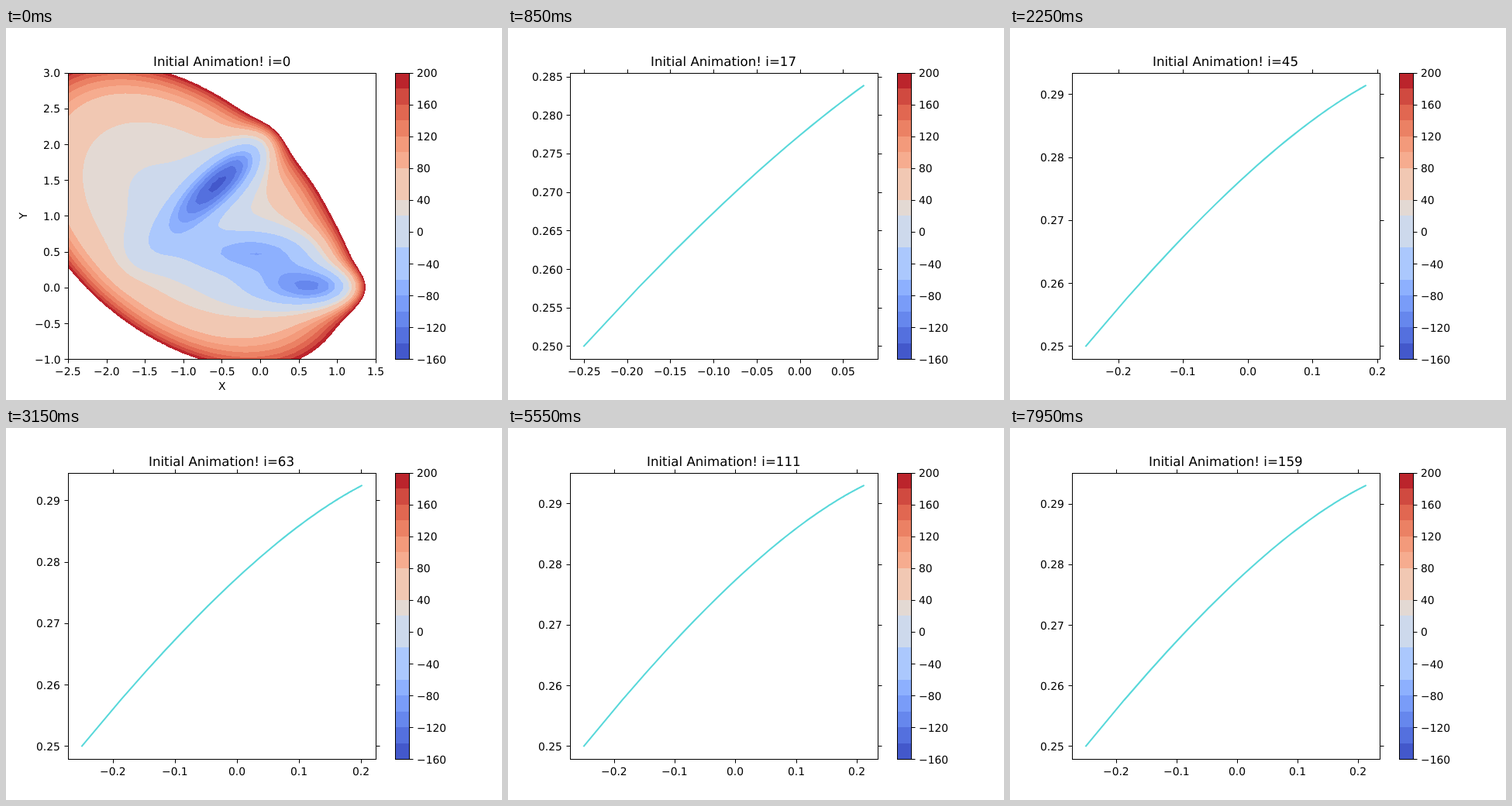
Write an HTML page with a canvas that moves like this. It is 640x480 px and loops after 8 s.

```html
<!DOCTYPE html>
<html lang="en">
<head>
<meta charset="utf-8">
<title>Initial Animation</title>
<style>
  html, body { margin: 0; width: 640px; height: 480px; overflow: hidden; background: #fff; }
  canvas { display: block; }
</style>
</head>
<body>
<canvas id="stage" width="640" height="480"></canvas>
<script>
const STEP_MS = 50, LOOP_MS = 8000, DAMPING = 0.05, START = [-0.25, 0.25];
const AXES = { left: 80, right: 476.8, top: 57.6, bottom: 427.2 };
const BAR = { left: 501.6, right: 520.08, top: 57.6, bottom: 427.2 };
const MARGIN = 0.05, TICK = 5, LABEL_GAP = 9.72;
const LEVEL_MIN = -160, LEVEL_MAX = 200, LEVEL_STEP = 20;
const BANDS = ['#4358cb', '#5470de', '#6687ed', '#799cf8', '#8db0fe', '#abc8fd',
  '#abc8fd', '#cdd9ec', '#cdd9ec', '#e3d9d3', '#f1c8b3', '#f1c8b3',
  '#f6ac8f', '#f39a7b', '#eb8164', '#e16751', '#d04a40', '#bb242c'];

// Müller–Brown potential: amplitude, a, b, c, x0, y0
const TERMS = [
  [-200, -1, 0, -10, 1, 0],
  [-100, -1, 0, -10, 0, 0.5],
  [-170, -6.5, 11, -6.5, -0.5, 1.5],
  [15, 0.7, 0.6, 0.7, -1, 1],
];

function potential(x, y) {
  const r = { v: 0, gx: 0, gy: 0, xx: 0, xy: 0, yy: 0 };
  for (const [A, a, b, c, x0, y0] of TERMS) {
    const dx = x - x0, dy = y - y0;
    const v = A * Math.exp(a * dx * dx + b * dx * dy + c * dy * dy);
    const px = 2 * a * dx + b * dy, py = b * dx + 2 * c * dy;
    r.v += v;
    r.gx += v * px;
    r.gy += v * py;
    r.xx += v * (px * px + 2 * a);
    r.xy += v * (px * py + b);
    r.yy += v * (py * py + 2 * c);
  }
  return r;
}

// Damped Newton iteration towards the saddle point
function newtonPath(count) {
  const path = [START];
  while (path.length < count) {
    const [x, y] = path[path.length - 1];
    const p = potential(x, y), det = p.xx * p.yy - p.xy * p.xy;
    path.push([
      x - DAMPING * (p.yy * p.gx - p.xy * p.gy) / det,
      y - DAMPING * (p.xx * p.gy - p.xy * p.gx) / det,
    ]);
  }
  return path;
}

const ctx = document.getElementById('stage').getContext('2d');
ctx.textRendering = 'geometricPrecision';
const path = newtonPath(LOOP_MS / STEP_MS);
const fullView = { x: [-2.5, 1.5], y: [-1, 3] };
const snap = v => Math.floor(v + 0.5) + 0.5;
const toX = (x, [lo, hi]) => AXES.left + (x - lo) / (hi - lo) * (AXES.right - AXES.left);
const toY = (y, [lo, hi]) => AXES.bottom - (y - lo) / (hi - lo) * (AXES.bottom - AXES.top);

function line(x1, y1, x2, y2) {
  ctx.beginPath();
  ctx.moveTo(x1, y1);
  ctx.lineTo(x2, y2);
  ctx.stroke();
}

function frame(box) {
  const x = snap(box.left), y = snap(box.top);
  ctx.strokeRect(x, y, snap(box.right) - x, snap(box.bottom) - y);
}

// align: 0 left, 0.5 centre, 1 right
function label(text, x, baseline, align, size = 13.89) {
  ctx.font = size + 'px "DejaVu Sans", sans-serif';
  ctx.fillText(text, Math.round(x - ctx.measureText(text).width * align), Math.round(baseline));
}

function ticks([lo, hi]) {
  const raw = (hi - lo) / 9, exp = Math.floor(Math.log10(raw)), unit = 10 ** exp;
  const factor = [1, 2, 2.5, 5, 10].find(f => f * unit >= raw * (1 - 1e-9));
  const step = factor * unit;
  const digits = Math.max(0, -exp + (factor === 2.5 ? 1 : factor === 10 ? -1 : 0));
  const list = [];
  for (let k = Math.ceil(lo / step - 1e-9); k <= hi / step + 1e-9; k++) {
    list.push({ value: k * step, text: (k < 0 ? '−' : '') + Math.abs(k * step).toFixed(digits) });
  }
  return list;
}

function drawAxes(view, bothSides) {
  const left = snap(AXES.left), right = snap(AXES.right);
  const top = snap(AXES.top), bottom = snap(AXES.bottom);
  for (const { value, text } of ticks(view.x)) {
    const x = toX(value, view.x), sx = snap(x);
    line(sx, bottom, sx, bottom + TICK);
    if (bothSides) line(sx, top, sx, top - TICK);
    label(text, x, 448, 0.5);
  }
  for (const { value, text } of ticks(view.y)) {
    const y = toY(value, view.y), sy = snap(y);
    line(left, sy, left - TICK, sy);
    if (bothSides) line(right, sy, right + TICK, sy);
    label(text, AXES.left - LABEL_GAP, y + 5.5, 1);
  }
  frame(AXES);
}

function drawColorbar() {
  const scale = (BAR.bottom - BAR.top) / BANDS.length;
  const x = Math.round(BAR.left), width = Math.round(BAR.right) - x;
  const edge = i => Math.round(BAR.bottom - i * scale);
  BANDS.forEach((color, i) => {
    ctx.fillStyle = color;
    ctx.fillRect(x, edge(i + 1), width, edge(i) - edge(i + 1));
  });
  ctx.fillStyle = '#000';
  frame(BAR);
  for (let v = LEVEL_MIN; v <= LEVEL_MAX; v += 40) {
    const y = BAR.bottom - (v - LEVEL_MIN) / LEVEL_STEP * scale;
    const right = snap(BAR.right);
    line(right, snap(y), right + TICK, snap(y));
    label((v < 0 ? '−' : '') + Math.abs(v), BAR.right + LABEL_GAP, y + 5.5, 0);
  }
}

// Filled contours of the potential sampled on a coarse square grid
function makeContours() {
  const n = 50, cells = n - 1, w = 397, h = 369, x0 = 80, y0 = 58;
  const grid = Array.from({ length: n * n }, (_, k) =>
    potential(-2.5 + 4 * (k % n) / cells, -1 + 4 * Math.floor(k / n) / cells).v);
  const canvas = document.createElement('canvas');
  canvas.width = w;
  canvas.height = h;
  const c = canvas.getContext('2d'), image = c.createImageData(w, h);
  const rgb = BANDS.map(hex => [1, 3, 5].map(k => parseInt(hex.slice(k, k + 2), 16)));
  for (let j = 0; j < h; j++) {
    const v = (AXES.bottom - y0 - j - 0.5) / (AXES.bottom - AXES.top) * cells;
    const row = Math.max(0, Math.min(cells - 1, Math.floor(v))), fv = v - row;
    for (let i = 0; i < w; i++) {
      const u = (x0 + i + 0.5 - AXES.left) / (AXES.right - AXES.left) * cells;
      const col = Math.min(cells - 1, Math.floor(u)), fu = u - col, k = row * n + col;
      const z = (grid[k] * (1 - fu) + grid[k + 1] * fu) * (1 - fv)
        + (grid[k + n] * (1 - fu) + grid[k + n + 1] * fu) * fv;
      const band = rgb[Math.floor((z - LEVEL_MIN) / LEVEL_STEP)];
      if (band) image.data.set([...band, 255], (j * w + i) * 4);
    }
  }
  c.putImageData(image, 0, 0);
  return canvas;
}
const contours = makeContours();

function limits(values) {
  let lo = Math.min(...values), hi = Math.max(...values);
  if (lo === hi) {
    const spread = 0.05 * Math.abs(lo);
    lo -= spread;
    hi += spread;
  }
  const pad = (hi - lo) * MARGIN;
  return [lo - pad, hi + pad];
}

function drawSurface() {
  ctx.drawImage(contours, 80, 58);
  drawAxes(fullView, false);
  label('X', 278.4, 467, 0.5);
  ctx.save();
  ctx.translate(27, 242.4);
  ctx.rotate(-Math.PI / 2);
  label('Y', 0, 0, 0.5);
  ctx.restore();
}

function drawPath(points) {
  const view = { x: limits(points.map(p => p[0])), y: limits(points.map(p => p[1])) };
  ctx.save();
  ctx.strokeStyle = '#58d8da';
  ctx.lineWidth = 2.08;
  ctx.lineJoin = 'round';
  ctx.lineCap = 'square';
  ctx.beginPath();
  points.forEach(([x, y]) => ctx.lineTo(toX(x, view.x), toY(y, view.y)));
  if (points.length > 1) ctx.stroke();
  ctx.restore();
  drawAxes(view, true);
}

function draw(i) {
  ctx.fillStyle = '#fff';
  ctx.fillRect(0, 0, 640, 480);
  ctx.fillStyle = ctx.strokeStyle = '#000';
  ctx.lineWidth = 1;
  drawColorbar();
  if (i === 0) drawSurface();
  else drawPath(path.slice(0, i));
  label('Initial Animation! i=' + i, 278.4, 49, 0.5, 16.67);
}

let shown = -1;
function tick() {
  const i = Math.floor(performance.now() % LOOP_MS / STEP_MS);
  if (i !== shown) draw(shown = i);
  requestAnimationFrame(tick);
}
tick();
</script>
</body>
</html>
```
